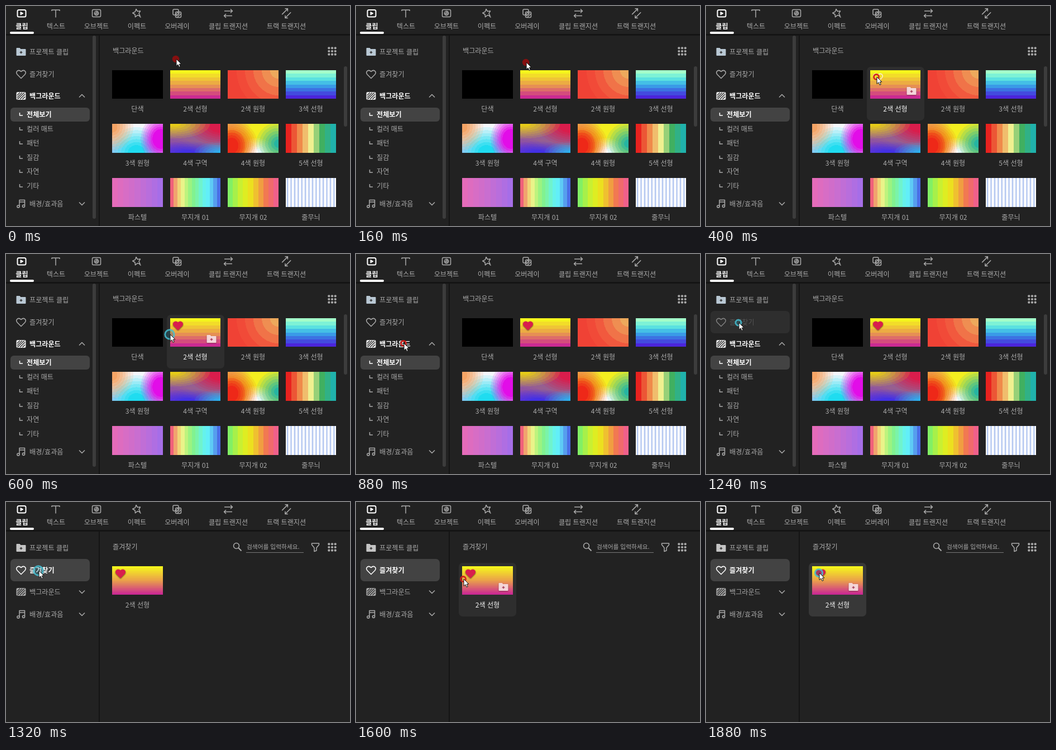
An HTML page for the animation above (1.92 s loop, 616 by 394 pixels).

```html
<!DOCTYPE html>
<html lang="ko">
<head>
<meta charset="utf-8">
<title>즐겨찾기</title>
<style>
html, body { margin: 0; width: 100%; height: 100%; overflow: hidden; background: #222; }
#stage { position: relative; width: 616px; height: 394px; overflow: hidden; background: #222;
  font: 12.1px/20px "Noto Sans CJK KR", "Noto Sans CJK", sans-serif; color: #aaa; }
#stage div, #stage svg { position: absolute; }
svg { overflow: visible; fill: none; stroke: currentColor; stroke-width: 1.5; stroke-linejoin: round; }
.view { inset: 0; }
.text { white-space: nowrap; }
.mid { width: 120px; text-align: center; }
.on { color: #fff; font-weight: 700; }
.card { width: 103px; height: 96px; border-radius: 7px; }
.card .heart, .card .add { visibility: hidden; }
.hover { background: #2e2e2e; color: #f4f4f4; }
.hover .heart, .hover .add, .liked .heart { visibility: visible; }
.heart { color: #fbeecb; }
.add { color: #f7dfe2; opacity: .92; filter: drop-shadow(0 1px 1px #0006); }
.add path + path { stroke: #a5405c; }
.liked .heart { color: #d91f4d; filter: drop-shadow(0 1px 1px #0009); }
.liked .heart svg { fill: currentColor; }
.pressed { background: #383838; }
</style>
</head>
<body>
<div id="stage"></div>
<script>
const stage = document.getElementById('stage');

function add(parent, cls, x, y, html = '') {
  const el = document.createElement('div');
  el.className = cls;
  el.style.left = x + 'px';
  el.style.top = y + 'px';
  el.innerHTML = html;
  return parent.appendChild(el);
}
function box(parent, x, y, w, h, fill, r = 0, cls = '') {
  const el = add(parent, cls, x, y);
  Object.assign(el.style, { width: w + 'px', height: h + 'px', background: fill, borderRadius: r + 'px' });
  return el;
}
// y is the vertical centre of the glyphs
const text = (parent, x, y, s, cls = '') => add(parent, 'text ' + cls, x, y - 10, s);
const centred = (parent, x, y, s, cls = '') => text(parent, x - 60, y, s, 'mid ' + cls);

const swap = '<path d="M-7-4H7.5M4-7.5L7.5-4L4-.8M7 4.5H-7.5M-4 8L-7.5 4.5L-4 1.2"/>';
const icons = {
  play: '<rect x="-7.5" y="-6" width="15" height="12.5" rx="2.5" stroke-width="2"/><path fill="currentColor" stroke-width="1" d="M-2-2.5L3 .2L-2 3Z"/>',
  type: '<path d="M-7-4V-6H7V-4M0-6V7.5"/>',
  object: '<rect x="-7.5" y="-6.5" width="15" height="13" rx="2"/><circle r="3.8" stroke-width="1.2"/><path stroke-width="1.2" d="M-3.5 1.5L1.5-3.5M-2.5 3L3-2.5M-.5 3.7L3.7-.5"/>',
  star: '<path d="M-1-7.5L1.5-3.5L6.5-4L4 .2L6 4.5L1.2 3.6L-2.5 6.8L-3 2L-7.3-.5L-2.8-2.6ZM4 4L7.5 7.5"/>',
  overlay: '<rect x="-7" y="-7" width="10" height="10" rx="2"/><rect x="-2.5" y="-2.5" width="10" height="10" rx="2"/><path stroke-width="1.2" d="M-2 2L2-2M-1 5L5-1M1 7L7 1"/>',
  swap,
  diagonal: `<g transform="rotate(-45)">${swap}</g>`,
  folder: '<path fill="currentColor" stroke-width="1" d="M-8-6.5H-2.5L-.5-4.5H8V6.5H-8Z"/><path stroke="#333" d="M-2.3 1H2.3M0-1.3V3.3"/>',
  heart: '<path d="M0 7.5L-7 .5C-10.5-4-5-9.5 0-4.5C5-9.5 10.5-4 7 .5Z"/>',
  hatch: '<rect x="-8" y="-6.5" width="16" height="13" rx="1.5" fill="currentColor" stroke-width="1"/><path stroke="#292929" stroke-width="1.2" d="M-7-1L-2-6M-7 3L2-6M-6.5 6L6-6M-2 6L7-3M2.5 6L7 1.5"/>',
  music: '<path d="M-3 5V-6.5H6.5V3.5M-3-3H6.5"/><circle cx="-5" cy="5" r="2.1"/><circle cx="4.5" cy="4.3" r="2.1"/>',
  up: '<path d="M-5 2.5L0-2.5L5 2.5"/>',
  down: '<path d="M-5-2.5L0 2.5L5-2.5"/>',
  branch: '<path d="M-2.5-3V2H3"/>',
  search: '<circle cx="-1.5" cy="-1.5" r="5"/><path stroke-width="2" d="M2.3 2.3L7.5 7.5"/>',
  funnel: '<path d="M-6.5-7H6.5V-4.5L2 1V6L-2 7.5V1L-6.5-4.5Z"/>',
  dots: [0, 1, 2, 3, 4, 5, 6, 7, 8].map(i =>
    `<circle cx="${(i % 3 - 1) * 5.7}" cy="${(Math.floor(i / 3) - 1) * 5.7}" r="2.1" fill="currentColor" stroke="none"/>`).join('')
};
function icon(parent, x, y, name, color = '', cls = '') {
  const el = add(parent, cls, x - 10, y - 10,
    `<svg width="20" height="20" viewBox="-10 -10 20 20">${icons[name]}</svg>`);
  el.style.color = color;
  return el;
}

const rgb = hex => [1, 3, 5].map(i => parseInt(hex.slice(i, i + 2), 16));
// n flat bands sampled along a colour ramp
function stops(n, ramp) {
  const cols = ramp.split(' ').map(rgb);
  return Array.from({ length: n }, (_, i) => {
    const p = i / (n - 1) * (cols.length - 1);
    const k = Math.min(Math.floor(p), cols.length - 2);
    const c = cols[k].map((v, j) => Math.round(v + (cols[k + 1][j] - v) * (p - k)));
    return `rgb(${c}) ${i * 100 / n}% ${(i + 1) * 100 / n}%`;
  }).join();
}
const bands = (dir, n, ramp) => `linear-gradient(${dir}, ${stops(n, ramp)})`;
const rings = (size, at, n, ramp) => `radial-gradient(${size} at ${at}, ${stops(n, ramp)})`;
// one colour fading outwards in flat rings around a solid core
function blob(size, at, hex, core = .3, n = 6) {
  const fade = Array.from({ length: n }, (_, i) => {
    const from = core + (1 - core) * i / n, to = core + (1 - core) * (i + 1) / n;
    return `rgba(${rgb(hex)},${1 - (i + 1) / (n + 1)}) ${from * 100}% ${to * 100}%`;
  });
  return `radial-gradient(${size} at ${at}, ${hex} ${core * 100}%, ${fade}, transparent 100%)`;
}
const twoTone = '#f5f51c #eaa04a #cb2a92';

const clips = [
  ['단색', '#000'],
  ['2색 선형', bands('180deg', 8, twoTone)],
  ['2색 원형', rings('90px 90px', '100% 0%', 6, '#eda95c #f07c4c #f1503a #f04235')],
  ['3색 선형', bands('180deg', 8, '#a4ffca #5fe9df #39aee9 #3d68e1 #4b25dc')],
  ['3색 원형', [
    blob('36px 42px', '96% 52%', '#e20de8', .42),
    blob('38px 42px', '0% 10%', '#f4a465', .25),
    blob('52px 46px', '48% 100%', '#1fdcf0'),
    blob('40px 30px', '0% 100%', '#a9bdf5', .1), '#f5f7fb'].join()],
  ['4색 구역', [
    blob('64px 26px', '8% 0%', '#e6cb18', .2),
    blob('58px 34px', '100% 8%', '#d91d4c', .35),
    blob('46px 20px', '100% 100%', '#28b4f2', .15),
    blob('64px 20px', '35% 100%', '#4330e5', .25),
    blob('48px 28px', '0% 100%', '#7c35c8', .1), '#965f91'].join()],
  ['4색 원형', [
    blob('24px 28px', '8% 75%', '#ee2818', .5, 3),
    blob('46px 44px', '8% 72%', '#f0741c', .5),
    blob('40px 38px', '100% 68%', '#26b5a2', .2),
    blob('34px 26px', '56% 100%', '#ffffff'),
    blob('42px 28px', '0% 0%', '#f0b45e'), '#f3ee20'].join()],
  ['5색 선형', bands('90deg', 9, '#e8221f #ef8a4a #f0f090 #40b060 #20b2ac')],
  ['파스텔', bands('90deg', 9, '#e56bb9 #c96ed0 #a66ee8')],
  ['무지개 01', bands('90deg', 14, '#f0607a #f1c06a #eef38a #b0f37a #82f28a #7af3b0 #66f3e6 #62eefa #5cb4f2 #4a6ee6')],
  ['무지개 02', bands('90deg', 10, '#82f064 #c5f035 #ebec18 #f0b437 #f17254 #f0608b')],
  ['줄무늬', 'repeating-linear-gradient(90deg, #fff 0 1.2px, #b6c9f1 2.5px 3.7px, #fff 5.2px 6.4px)']
];

function card(parent, col, row, [name, fill]) {
  const x = 184 + col * 103.5, y = 109 + row * 96.7;
  const el = add(parent, 'card', x, y);
  box(el, 6.3, 5.7, 90.5, 51.5, fill);
  centred(el, 51.5, 75.3, name);
  icon(el, 20.5, 19, 'heart', '', 'heart');
  icon(el, 80, 43, 'folder', '', 'add');
  return { el, x, y };
}

const grey = '#aaa';
const view = () => add(stage, 'view', 0, 0);

// Top bar
[['클립', 28.5, 'play'], ['텍스트', 89.5, 'type'], ['오브젝트', 162, 'object'], ['이펙트', 234.5, 'star'],
 ['오버레이', 306.5, 'overlay'], ['클립 트랜지션', 398, 'swap'], ['트랙 트랜지션', 502, 'diagonal']
].forEach(([name, x, pic], i) => {
  icon(stage, x - .5, 12.5, pic, i ? grey : '#fff');
  centred(stage, x, 35.5, name, i ? '' : 'on');
});
box(stage, 0, 50, 616, 2.5, '#141414');
box(stage, 7, 45.5, 42.5, 4.5, '#fff', 2);
box(stage, 165.5, 52, 2.5, 342, '#141414');

// Library
const library = view();
box(library, 155, 53, 6, 328, '#3c3c3c', 3);
box(library, 604.5, 108, 6.5, 108, '#3c3c3c', 3);
const favHover = box(library, 7.5, 102, 142.5, 39.5, '#2e2e2e', 7);
icon(library, 26.5, 81.5, 'folder', '#b9c8d4');
text(library, 42, 81.5, '프로젝트 클립');
const favIcon = icon(library, 26.5, 122, 'heart', grey);
const favText = text(library, 42, 121.5, '즐겨찾기');
icon(library, 26.5, 161, 'hatch', '#e8e8e8');
text(library, 42, 160.5, '백그라운드', 'on');
icon(library, 135.5, 161, 'up');
box(library, 7.5, 181.5, 142.5, 25.5, '#434343', 6);
['전체보기', '컬러 매트', '패턴', '질감', '자연', '기타'].forEach((name, i) => {
  const y = 194 + i * 25.5;
  icon(library, 27, y, 'branch', i ? grey : '#fff');
  text(library, 37, y, name, i ? '' : 'on');
});
icon(library, 27, 354, 'music');
text(library, 42, 353.5, '배경/효과음');
icon(library, 135.5, 354, 'down');
text(library, 191, 80, '백그라운드');
const cards = clips.map((c, i) => card(library, i % 4, Math.floor(i / 4), c));

// Favourites
const favourites = view();
box(favourites, 7.5, 102, 142.5, 39.5, '#434343', 7);
icon(favourites, 26.5, 81.5, 'folder', '#c4c4c4');
text(favourites, 42, 81.5, '프로젝트 클립');
icon(favourites, 26.5, 122, 'heart', '#fff');
text(favourites, 42, 121.5, '즐겨찾기', 'on');
icon(favourites, 26.5, 161, 'hatch', grey);
text(favourites, 42, 160.5, '백그라운드');
icon(favourites, 135.5, 161, 'down');
icon(favourites, 27, 201, 'music');
text(favourites, 42, 201, '배경/효과음');
icon(favourites, 135.5, 201, 'down');
text(favourites, 191, 80, '즐겨찾기');
icon(favourites, 413.5, 80, 'search');
text(favourites, 431, 80, '검색어를 입력하세요.').style.fontSize = '10.7px';
box(favourites, 430, 90, 103, 1, '#777');
icon(favourites, 554, 80.5, 'funnel');
const saved = card(favourites, 0, 0, ['2색 선형', bands('180deg', 17, twoTone)]);
saved.el.classList.add('liked');
icon(stage, 584, 80.5, 'dots');

// Pointer and its marker
const pointer = add(stage, '', 0, 0, `<svg width="1" height="1">
  <circle id="ring" cx="-1" cy="0"/>
  <path fill="#fff" stroke="#111" stroke-width="1" d="M0 0V12.5L3 9.8L5 14.4L7.2 13.4L5.2 9H9Z"/></svg>`);
const ring = document.getElementById('ring');

const LOOP = 1920, STEP = 40, LIKE = 520, OPEN = 1240, SWITCH = 1320, UNLIKE = 1840;
const path = [[0, 305, 95], [120, 305, 98], [320, 306, 127], [520, 306, 127], [600, 294, 144], [840, 88, 161],
  [880, 86, 160], [1120, 59, 123], [1320, 59, 123], [1600, 193, 138], [1760, 203, 127], [1920, 203, 127]];

function locate(t) {
  const i = path.findIndex(p => p[0] > t);
  const [t0, x0, y0] = path[i - 1], [t1, x1, y1] = path[i];
  const p = (t - t0) / (t1 - t0), e = p * p * (3 - 2 * p);
  return [x0 + (x1 - x0) * e, y0 + (y1 - y0) * e];
}
const inside = (x, y, l, t, w, h) => x >= l && x < l + w && y >= t && y < t + h;
const set = (el, attrs) => Object.entries(attrs).forEach(([k, v]) => el.setAttribute(k, v));

function render(t) {
  const [x, y] = locate(t);
  const opened = t >= SWITCH;
  library.style.display = opened ? 'none' : '';
  favourites.style.display = opened ? '' : 'none';
  pointer.style.transform = `translate(${x}px, ${y}px)`;

  [...cards, saved].forEach(c =>
    c.el.classList.toggle('hover', inside(x, y, c.x, c.y, 103, 96)));
  cards[1].el.classList.toggle('liked', t >= LIKE);
  saved.el.classList.toggle('pressed', t >= UNLIKE);

  const over = inside(x, y, 7.5, 102, 142.5, 39.5);
  favHover.style.visibility = over ? 'inherit' : 'hidden';
  favText.style.color = over ? (t >= OPEN ? '#555' : '#fff') : grey;
  favIcon.style.color = over && t >= OPEN ? '#808080' : grey;

  const click = [LIKE, OPEN, UNLIKE].find(s => t >= s && t < s + 120);
  if (click !== undefined) {
    set(ring, { r: 5 + (t - click) / 25, fill: '#1a7f9455', stroke: '#45bfd2', 'stroke-width': 3, opacity: .85 });
  } else {
    const idle = t < 200;
    set(ring, { r: idle ? 5.5 : 4.5, fill: idle ? '#8c1010' : 'none', stroke: idle ? '#8c1010' : '#d01c18',
      'stroke-width': idle ? 1.5 : 2.8, opacity: .95 });
  }
}

function tick() {
  render(Math.floor(performance.now() % LOOP / STEP) * STEP);
  requestAnimationFrame(tick);
}
tick();
</script>
</body>
</html>
```
